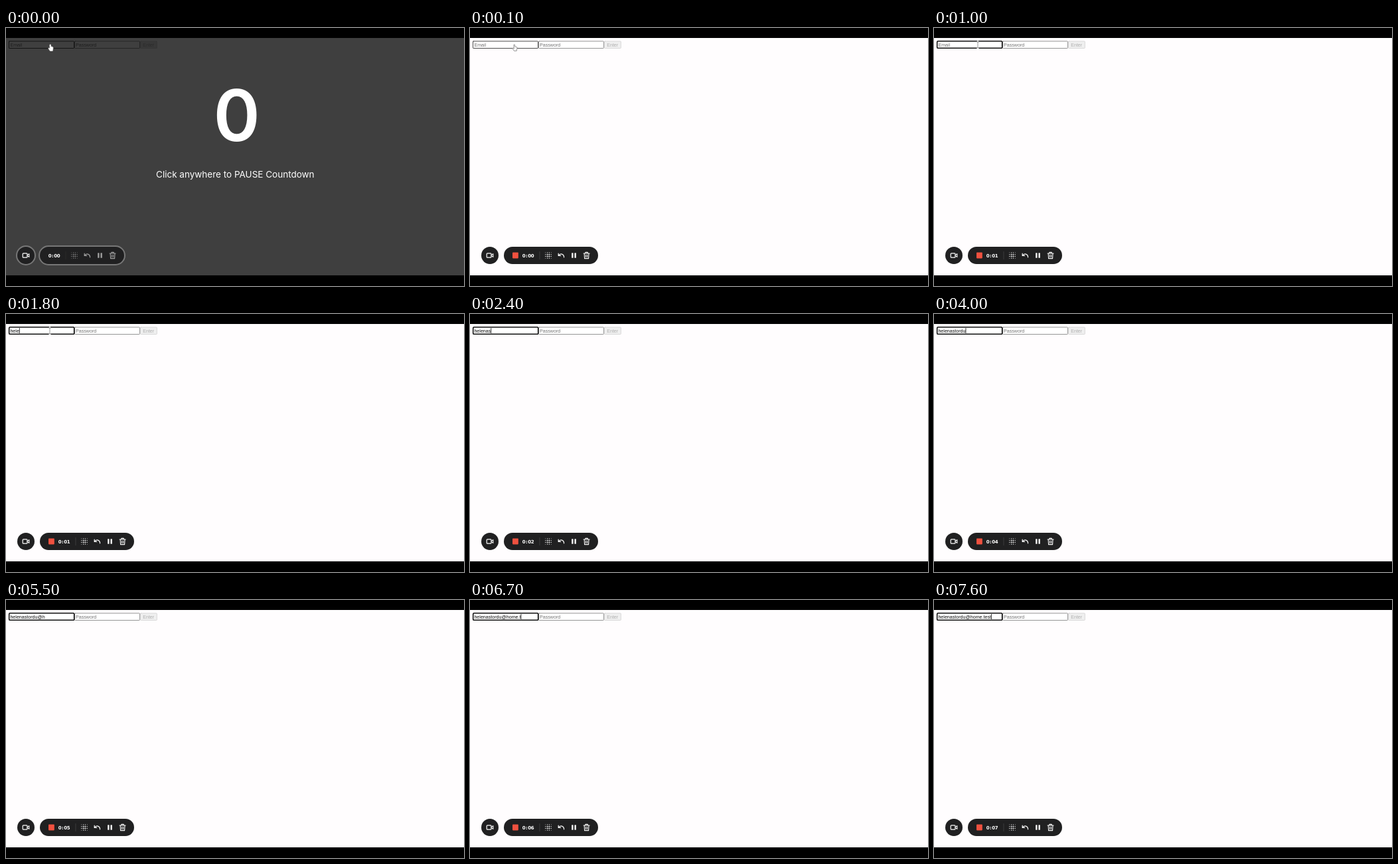
Recreate the animation shown at these times as an HTML page with a canvas. Size 690 px wide and 388 px high, loop 8 s.

```html
<!DOCTYPE html>
<html lang="en">
<head>
<meta charset="utf-8">
<title>Sign-in recording</title>
<style>
  html, body { margin: 0; width: 100%; height: 100%; overflow: hidden; background: #000; }
  canvas { display: block; width: 690px; height: 388px; }
</style>
</head>
<body>
<canvas id="stage"></canvas>
<script>
const W = 690, H = 388, LOOP = 8000;
const EMAIL = 'helenastordu@home.test';
const SANS = '7.11px "Liberation Sans", Arial, sans-serif';
const DIGITS = 'bold 7px "DejaVu Sans", sans-serif';

// One time per typed character; a wrong letter appears between TYPO[0] and TYPO[1].
const KEYS = [1300, 1400, 1600, 1800, 2000, 2100, 2300, 3200, 3300, 3500, 3600, 3800,
  4300, 4900, 6000, 6100, 6300, 6400, 6700, 7100, 7400, 7600];
const TYPO = [5300, 5500];
const CARET_OFF = [[1000, 1300], [2900, 3200], [4700, 4900], [5500, 6000]];
const OVERLAY_END = 100, HAND_END = 200, FOCUS = 500, BEAM_END = 2400;

const canvas = document.getElementById('stage');
const ctx = canvas.getContext('2d');
const dpr = window.devicePixelRatio || 1;
canvas.width = W * dpr;
canvas.height = H * dpr;

const within = (t, [a, b]) => t >= a && t < b;

function rect(x, y, w, h, color) {
  ctx.fillStyle = color;
  ctx.fillRect(x, y, w, h);
}

function round(x, y, w, h, r, fill, stroke, width = 1) {
  ctx.beginPath();
  ctx.roundRect(x, y, w, h, r);
  if (fill) { ctx.fillStyle = fill; ctx.fill(); }
  if (stroke) { ctx.strokeStyle = stroke; ctx.lineWidth = width; ctx.stroke(); }
}

function text(s, x, y, font, color, align = 'left') {
  ctx.font = font;
  ctx.fillStyle = color;
  ctx.textAlign = align;
  ctx.fillText(s, x, y);
}

function line(path, color, width) {
  ctx.strokeStyle = color;
  ctx.lineWidth = width;
  ctx.stroke(new Path2D(path));
}

function at(x, y, draw) {
  ctx.save();
  ctx.translate(x, y);
  draw();
  ctx.restore();
}

function form(t, dark) {
  const focused = t >= FOCUS;
  const hint = dark ? '#1d1d1d' : '#757575';
  const page = dark ? '#3f3f3f' : '#fff';
  round(103.5, 19.9, 98, 10.6, 0.8, page, dark ? '#232323' : '#8a8a8a', 0.9);
  text('Password', 105, 27.5, SANS, hint);
  round(202.4, 19.9, 25, 10.6, 1, dark ? '#383838' : '#efefef', dark ? '#343434' : '#d2d2d2', 0.8);
  text('Enter', 214.7, 27.5, SANS, dark ? '#2b2b2b' : '#b0b0b0', 'center');

  if (focused) round(4.7, 19.8, 98, 10.5, 1.4, page, '#101010', 1.6);
  else round(4.5, 19.9, 98, 10.6, 0.6, page, dark ? '#141414' : '#4c4c4c', 1);

  const count = KEYS.filter(k => k <= t).length;
  const value = EMAIL.slice(0, count) + (within(t, TYPO) ? 'e' : '');
  if (value) text(value, 6.4, 27.5, SANS, '#111');
  else text('Email', 6.4, 27.5, SANS, hint);

  if (focused && !CARET_OFF.some(span => within(t, span))) {
    ctx.font = SANS;
    rect(6.4 + ctx.measureText(value).width, 21, 0.9, 8, '#222');
  }
}

function hand(dark) {
  const path = new Path2D('M66 25.2Q66.8 24.3 67.5 25.2V27.8L70 28.4Q71.2 28.8 71 30.2L70.2 34.4H66.4L63.9 30.8Q64 29.7 65.1 30.1L66 30.8Z');
  ctx.fillStyle = '#fff';
  ctx.fill(path);
  ctx.lineWidth = 0.8;
  ctx.strokeStyle = dark ? '#d8d8d8' : '#777';
  ctx.stroke(path);
}

function beam() {
  line('M66 20.6V30.8', '#fff', 2.8);
  line('M66 21.4V29.6M64.6 21.2H67.4M64.6 29.8H67.4', '#8c8c8c', 0.9);
}

function dots(color) {
  ctx.fillStyle = color;
  for (let i = 0; i < 4; i++) for (let j = 0; j < 4; j++) {
    const dx = (i - 1.5) * 2.8, dy = (j - 1.5) * 2.8;
    const far = Math.hypot(dx, dy);
    ctx.beginPath();
    ctx.arc(dx, dy, far > 5 ? 0.45 : far > 3 ? 0.65 : 0.95, 0, 7);
    ctx.fill();
  }
}

function undo(color) {
  line('M-4.2 -3V0.4H-0.8M-4 0.2C-1.2 -3.6 4 -2.4 4.2 2.8', color, 1.2);
}

function pause(color) {
  round(-3.3, -3.8, 2.3, 7.6, 0.5, color);
  round(1, -3.8, 2.3, 7.6, 0.5, color);
}

function trash(color) {
  line('M-4.5 -3H4.5M-1.7 -3V-4.6H1.7V-3M-3.4 -3L-3 4.6H3L3.4 -3M-1.1 -0.8V2.6M1.1 -0.8V2.6', color, 1.1);
}

function camera(color) {
  round(-4.6, -3.2, 6.8, 6.4, 1, null, color, 1.2);
  line('M2.4 -0.6L5 -2.4V2.4L2.4 0.6', color, 1.1);
}

function clock(x, seconds) {
  const offsets = [2.2, 6.5, 10.8, 15.1];
  [...('0:0' + seconds)].forEach((c, i) => text(c, x + offsets[i], 344.6, DIGITS, '#fff', 'center'));
}

function toolbar(t, waiting) {
  const body = '#202021';
  const y = 342;
  const shift = waiting ? -15 : 0;
  const ink = waiting ? '#a2a2a2' : '#fff';
  if (waiting) {
    round(16, 328, 28, 28, 14, body, '#777', 2);
    round(50, 328, 129, 28, 14, body, '#777', 2);
  } else {
    round(17, 329, 26, 26, 13, body);
    round(51, 329, 142, 26, 13, body);
    round(64, 337.6, 8.8, 8.8, 0.8, '#f0513f');
  }
  at(29.8, y, () => camera('#fff'));
  clock(79 + shift, Math.floor(t / 1000));
  rect(104.5 + shift, 336, 0.9, 12, waiting ? '#2b2b2c' : '#3e3e40');
  at(118 + shift, y, () => dots(waiting ? '#858585' : '#fff'));
  at(137.4 + shift, y, () => undo(ink));
  at(156.5 + shift, y, () => pause(ink));
  at(175.6 + shift, y, () => trash(ink));
}

function draw(t) {
  const waiting = t < OVERLAY_END;
  ctx.setTransform(dpr, 0, 0, dpr, 0, 0);
  ctx.lineCap = ctx.lineJoin = 'round';
  rect(0, 0, W, H, '#000');
  rect(0, 15, W, 357, waiting ? '#3f3f3f' : '#fffdfe');
  form(t, waiting);
  if (waiting) {
    text('0', 347.7, 169.8, '600 106.5px Inter, sans-serif', '#fff', 'center');
    text('Click anywhere to PAUSE Countdown', 345.3, 225.3, '13.5px Inter, sans-serif', '#fff', 'center');
  }
  if (t < HAND_END) hand(waiting);
  else if (t < BEAM_END) beam();
  toolbar(t, waiting);
}

const start = performance.now();
function tick() {
  draw((performance.now() - start) % LOOP);
  requestAnimationFrame(tick);
}
tick();
</script>
</body>
</html>
```
